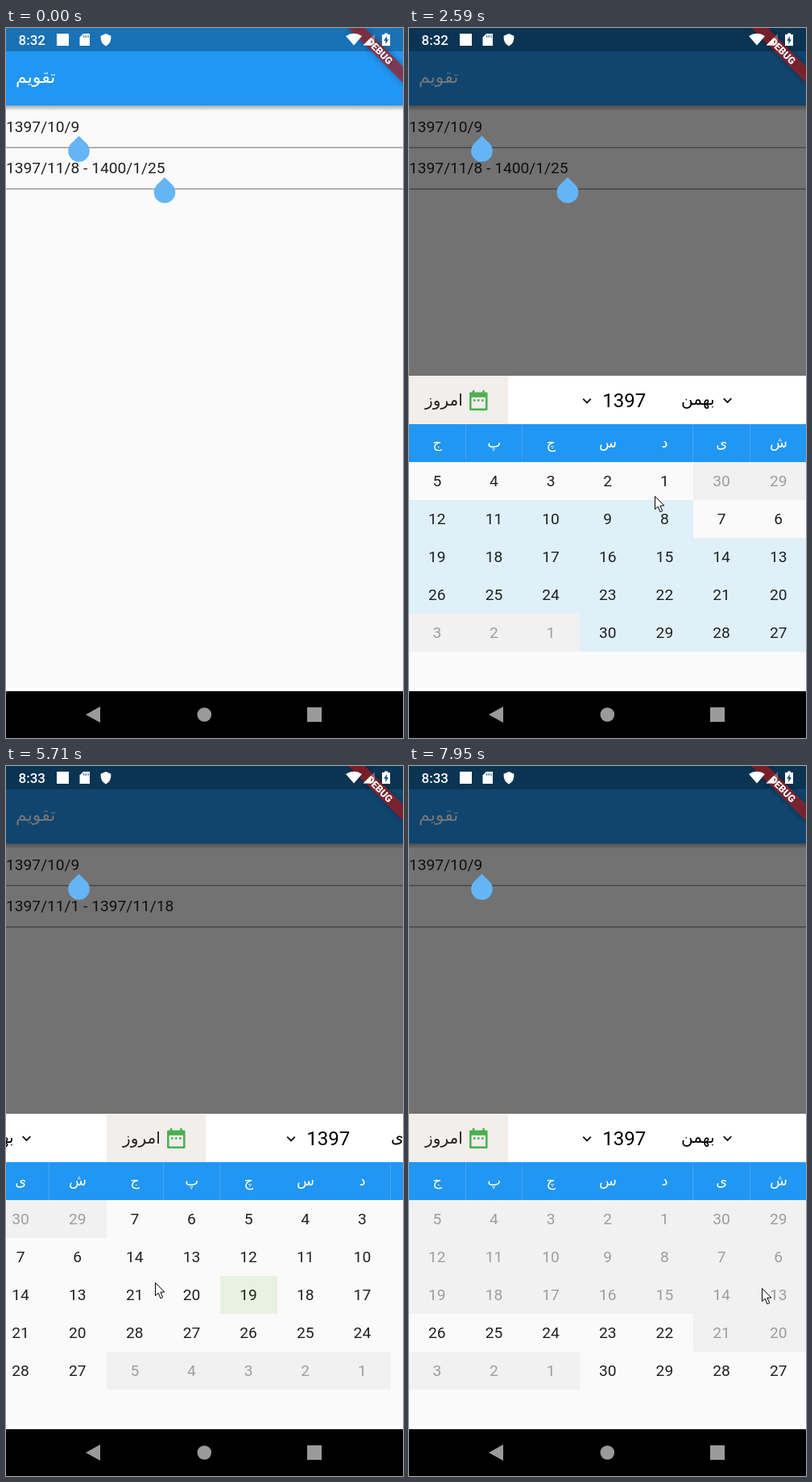
An HTML page with a canvas for the animation above (8000 ms loop, 493 by 880 pixels).

```html
<!DOCTYPE html>
<html lang="fa">
<head>
<meta charset="utf-8">
<style>
html, body { margin: 0; width: 100%; height: 100%; overflow: hidden; background: #000; }
canvas { display: block; width: 493px; height: 880px; }
</style>
</head>
<body>
<canvas id="stage" width="493" height="880"></canvas>
<script>
const ctx = document.getElementById('stage').getContext('2d');
const W = 493, LOOP = 8000, PAGE = 494.5, COL = PAGE / 7, ROW = 46.9, SHEET = 391;
const LATIN = 'Roboto, sans-serif', ARABIC = '"DejaVu Sans", sans-serif';
const BLUE = '#2196f3', PAPER = '#fafafa', INK = '#212121', WHITE = '#fff', GREEN = '#4caf50';
const WEEK = ['ج', 'پ', 'چ', 'س', 'د', 'ی', 'ش'];

const DRAG_NEXT = { begin: 5290, end: 5560, x: 185, y: 640 };
const DRAG_BACK = { begin: 6170, end: 6400, x: 455, y: 635 };
const SLOP = 16;

// Eased pointer moves; sag bends a move downwards
const MOVES = [
  { begin: 70, end: 620, x: 258, y: 193 },
  { begin: 1060, end: 1620, x: 354, y: 660 },
  { begin: 1670, end: 2590, x: 305, y: 580 },
  { begin: 3000, end: 3850, x: 108, y: 660 },
  { begin: 4380, end: 5080, x: 331, y: 643, sag: 56 },
  DRAG_NEXT,
  DRAG_BACK,
  { begin: 6400, end: 7010, x: 335, y: 712 },
  { begin: 7010, end: 7480, x: 314, y: 691 },
  { begin: 7710, end: 7950, x: 438, y: 647 }
];

// Chosen days: a range, or an open start waiting for its end
const STATES = [
  { at: 0, from: 8, to: 30, text: '1397/11/8 - 1400/1/25', handle: true },
  { at: 2830, open: 1, text: '' },
  { at: 4000, from: 1, to: 18, text: '1397/11/1 - 1397/11/18' },
  { at: 7150, open: 22, text: '' }
];

const BAHMAN = { name: 'بهمن', friday: 5, shift: 0 };
const DEY = { name: 'دی', friday: 7, shift: 8, today: 19 };

const clamp = v => Math.min(1, Math.max(0, v));
const smooth = u => u * u * (3 - 2 * u);

function rect(color, x, y, w, h) {
  ctx.fillStyle = color;
  ctx.fillRect(x, y, w, h);
}

function text(str, x, y, size, color, align = 'center', family = LATIN, weight = 400) {
  ctx.font = `${weight} ${size}px ${family}`;
  ctx.textAlign = align;
  ctx.fillStyle = color;
  ctx.fillText(str, x, y);
}

function poly(color, ...pts) {
  ctx.beginPath();
  for (let i = 0; i < pts.length; i += 2) ctx.lineTo(pts[i], pts[i + 1]);
  ctx.closePath();
  ctx.fillStyle = color;
  ctx.fill();
}

function disc(color, x, y, r) {
  ctx.beginPath();
  ctx.arc(x, y, r, 0, 7);
  ctx.fillStyle = color;
  ctx.fill();
}

function at(x, y, paint) {
  ctx.save();
  ctx.translate(x, y);
  paint();
  ctx.restore();
}

function pointerAt(t) {
  let x = 396, y = 773;
  for (const m of MOVES) {
    if (t < m.begin) break;
    const u = smooth(clamp((t - m.begin) / (m.end - m.begin)));
    x += (m.x - x) * u;
    y += (m.y - y) * u + (m.sag || 0) * Math.sin(Math.PI * u);
  }
  return { x, y };
}

// Overdamped spring from distance x with speed v after ms
function spring(x, v, ms) {
  const slow = 9.07, fast = 22, s = ms / 1000;
  const a = (v + fast * x) / (fast - slow);
  return a * Math.exp(-slow * s) + (x - a) * Math.exp(-fast * s);
}

function dragged(drag, t) {
  const dx = pointerAt(Math.min(t, drag.end)).x - pointerAt(drag.begin - 1).x;
  return Math.sign(dx) * Math.max(0, Math.abs(dx) - SLOP);
}

function pageOffset(t) {
  if (t < DRAG_NEXT.begin) return 0;
  const next = dragged(DRAG_NEXT, t);
  if (t < DRAG_NEXT.end) return next;
  if (t < DRAG_BACK.begin) return spring(PAGE + next, -1400, t - DRAG_NEXT.end) - PAGE;
  const back = dragged(DRAG_BACK, t) - PAGE;
  return t < DRAG_BACK.end ? back : spring(back, 1000, t - DRAG_BACK.end);
}

function drop(x, y) {
  const r = 13.3, k = r * Math.SQRT1_2;
  disc('#64b5f6', x, y, r);
  poly('#64b5f6', x, y - 2 * k, x + k, y - k, x, y, x - k, y - k);
}

function chevron(x, y) {
  ctx.beginPath();
  ctx.moveTo(x - 4.8, y - 2.4);
  ctx.lineTo(x, y + 2.4);
  ctx.lineTo(x + 4.8, y - 2.4);
  ctx.strokeStyle = '#111';
  ctx.lineWidth = 1.9;
  ctx.stroke();
}

function calendarIcon() {
  ctx.scale(1.25, 1.25);
  ctx.strokeStyle = GREEN;
  ctx.lineWidth = 2;
  ctx.lineJoin = 'round';
  ctx.strokeRect(4, 5, 16, 16);
  rect(GREEN, 4, 5, 16, 4);
  for (const x of [6, 16]) rect(GREEN, x, 2, 2, 3);
  for (const x of [7, 11, 15]) rect(GREEN, x, 11, 2, 2);
}

function drawApp(t, state) {
  rect(PAPER, 0, 0, W, 822);
  rect(WHITE, 0, 818, W, 4);
  const shade = ctx.createLinearGradient(0, 96, 0, 103);
  shade.addColorStop(0, 'rgba(0,0,0,.32)');
  shade.addColorStop(1, 'rgba(0,0,0,0)');
  rect(shade, 0, 96, W, 7);
  rect(BLUE, 0, 0, W, 96);
  rect('rgba(0,0,0,.25)', 0, 0, W, 28.8);
  text('تقویم', 43, 68, 22, WHITE, 'center', ARABIC);

  if (t > 800 && t < 1250) {
    ctx.save();
    ctx.beginPath();
    ctx.rect(0, 149, W, 50);
    ctx.clip();
    disc(`rgba(0,0,0,${0.035 * clamp((1250 - t) / 200)})`, 258, 183, (t - 780) * 0.85);
    ctx.restore();
  }
  text('1397/10/9', 0, 128.8, 19.2, INK, 'left');
  text(state.text, 0, 180.3, 19.2, INK, 'left');
  for (const y of [147.6, 198.9]) rect('#868686', 0, y, W, 1.2);
}

function drawDays(month, state) {
  for (let i = 0; i < 35; i++) {
    const c = i % 7, r = (i - c) / 7;
    const day = month.friday + 7 * r - c;
    const outside = day < 1 || day > 30;
    const off = outside || day < state.open;
    const x = Math.round(c * COL), y = Math.round(107 + r * ROW);
    const right = Math.round((c + 1) * COL), bottom = Math.round(107 + (r + 1) * ROW);
    let fill = PAPER;
    if (off) fill = '#f1f1f1';
    else if (day >= state.from && day <= state.to) fill = '#dff0f9';
    else if (day === month.today) fill = '#e9f2e0';
    rect(fill, x, y, right - x, bottom - y);
    text((day + 29) % 30 + 1, (c + 0.5) * COL - 0.5, 107 + (r + 0.5) * ROW + 7, 19.2, off ? '#9e9e9e' : INK);
  }
}

function drawMonth(month, state) {
  rect(WHITE, 0, 0, PAGE + 1, SHEET);
  rect('#f1eeec', 0, 0, 123, 60);
  text('امروز', 43, 37, 20, INK, 'center', ARABIC);
  at(71.3, 15.5, calendarIcon);
  chevron(221 + month.shift, 31);
  text('1397', 267.3 + month.shift, 39, 24, '#000');
  text(month.name, 361, 36, 20, '#000', 'center', ARABIC);
  chevron(395.5 - month.shift, 30.5);

  rect(BLUE, 0, 60, PAGE + 1, 47);
  WEEK.forEach((name, c) => {
    if (c % 7 && c % 5 < 3) rect('rgba(255,255,255,.16)', Math.round(c * COL) - 1, 60, 1, 47);
    text(name, (c + 0.5) * COL - 0.3, 89, 18, WHITE, 'center', ARABIC);
  });
  rect(PAPER, 0, 107, PAGE + 1, SHEET - 111);
  drawDays(month, state);
}

function drawBanner() {
  ctx.save();
  ctx.translate(W, 0);
  ctx.rotate(Math.PI / 4);
  ctx.shadowColor = 'rgba(0,0,0,.5)';
  ctx.shadowBlur = 7;
  rect('rgba(183,28,28,.63)', -50, 33.6, 100, 14.4);
  ctx.shadowColor = 'transparent';
  text('DEBUG', 0, 45.2, 12.3, WHITE, 'center', LATIN, 900);
  ctx.restore();
}

function drawStatus(t) {
  text(t < 4700 ? '8:32' : '8:33', 15.5, 21, 17, WHITE, 'left', LATIN, 500);
  rect(WHITE, 63, 7, 15, 15);

  poly(WHITE, 96, 7, 104, 7, 104, 22, 91.5, 22, 91.5, 11.5);
  for (let i = 0; i < 3; i++) rect('rgba(25,100,165,.8)', 96 + 2.7 * i, 9, 1.3, 3);

  ctx.beginPath();
  ctx.moveTo(124, 7);
  ctx.lineTo(130.4, 9.7);
  ctx.quadraticCurveTo(131, 19, 124, 22.4);
  ctx.quadraticCurveTo(117, 19, 117.6, 9.7);
  ctx.fillStyle = WHITE;
  ctx.fill();

  ctx.beginPath();
  ctx.moveTo(432, 21.5);
  ctx.lineTo(422, 10);
  ctx.quadraticCurveTo(432, 3.5, 442, 10);
  ctx.fill();

  poly('rgba(255,255,255,.3)', 443.5, 21.5, 458, 21.5, 458, 7);
  poly(WHITE, 443.5, 21.5, 453, 21.5, 453, 12);

  rect(WHITE, 470, 6.5, 4, 2);
  rect(WHITE, 467, 8, 10, 14);
  poly('#15507f', 472.8, 10, 469.2, 15.8, 471.4, 15.8, 471.4, 20, 475, 14.2, 472.8, 14.2);
}

function drawNav() {
  const gray = '#9a9a9a';
  rect('#000', 0, 822, W, 58);
  poly(gray, 99, 851, 117, 841, 117, 861);
  disc(gray, 246.3, 851, 8.8);
  rect(gray, 374, 842, 18, 18);
}

function arrow() {
  poly(WHITE, 0, 0, 0, 16, 3.7, 12.7, 6.5, 19.3, 9.2, 18.1, 6.4, 11.7, 11.3, 11.5);
  ctx.strokeStyle = '#000';
  ctx.lineWidth = 1;
  ctx.stroke();
}

function draw(t) {
  const state = STATES.filter(s => s.at <= t).pop();
  const open = clamp((t - 840.5) / 200);
  drawApp(t, state);
  rect(`rgba(0,0,0,${0.54 * (1 - (1 - open) ** 2.4)})`, 0, 0, W, 822);
  if (open > 0) {
    const top = Math.round(822 - SHEET * open), x = Math.round(pageOffset(t));
    at(x, top, () => drawMonth(BAHMAN, x > -PAGE / 2 ? state : {}));
    if (x < -1) at(x + Math.round(PAGE), top, () => drawMonth(DEY, {}));
  }
  drop(90.5, 152.5);
  if (state.handle) drop(197, 203.7);
  drawBanner();
  drawStatus(t);
  drawNav();
  if (t >= MOVES[0].begin) {
    const { x, y } = pointerAt(t);
    at(x + 0.5, y + 0.5, arrow);
  }
}

const start = performance.now();
function tick() {
  draw((performance.now() - start) % LOOP);
  requestAnimationFrame(tick);
}
tick();
</script>
</body>
</html>
```
